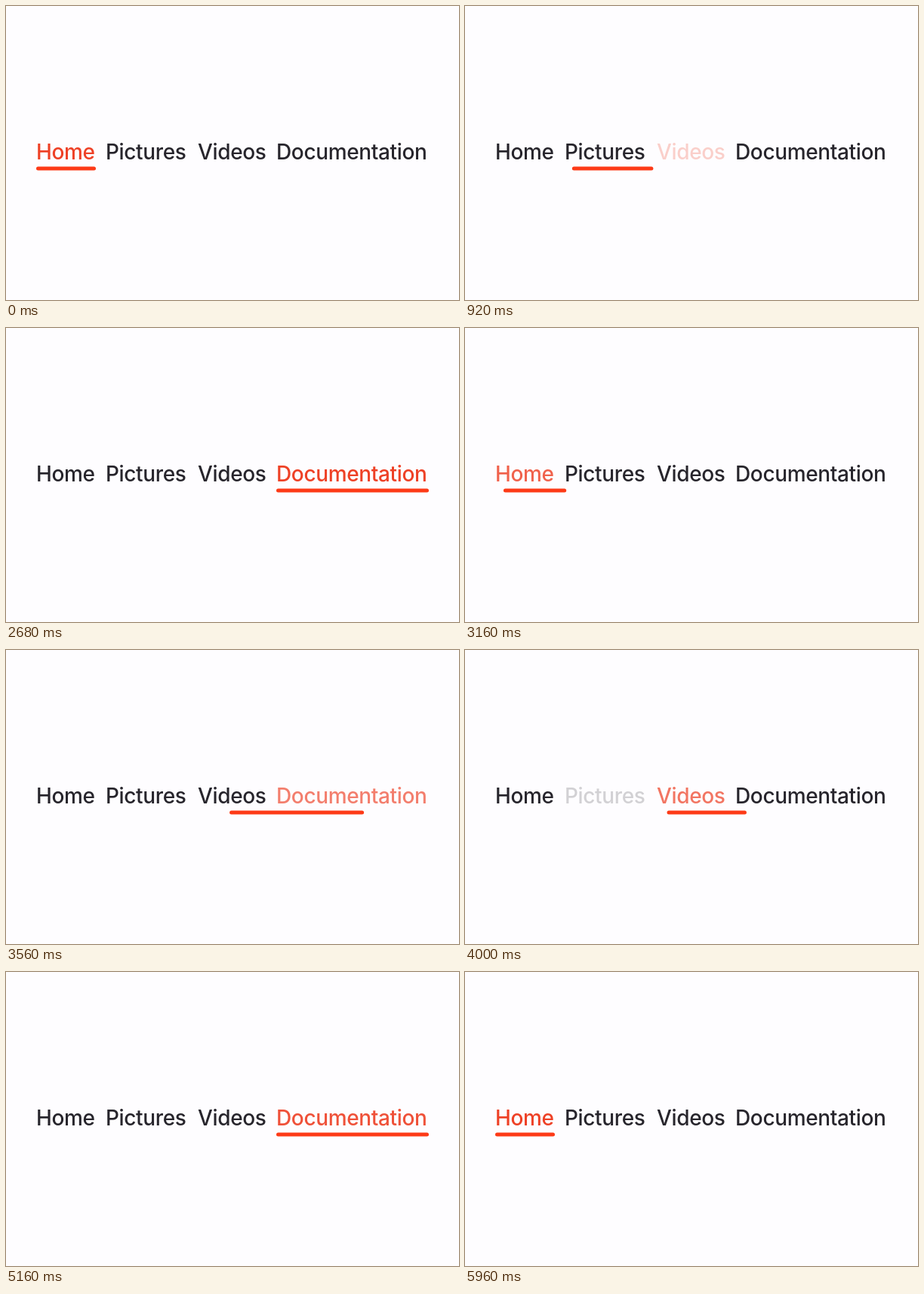
Animation of 600 by 389 pixels, one loop 6000 ms. Source, as an HTML page:

```html
<!DOCTYPE html>
<html lang="en">
<head>
<meta charset="utf-8">
<title>Tab bar</title>
<style>
  html, body { margin: 0; width: 100%; height: 100%; overflow: hidden; background: #fefdff; }
  svg { display: block; width: 600px; height: 389px; }
  text { font: 500 28px Inter, "Open Sans", sans-serif; letter-spacing: -.36px; }
</style>
</head>
<body>
<svg viewBox="0 0 600 389">
  <rect id="bar" y="212.5" height="5" rx="2.5" fill="#fd3a17"/>
</svg>
<script>
const LOOP = 6000, SLIDE = 350, FADE = 450, DIM = .2;
const RED = '#ee4126', INK = '#27252c';

// label, left and right edge
const tabs = [
  ['Home', 40, 119],
  ['Pictures', 132, 241],
  ['Videos', 254, 345],
  ['Documentation', 358, 560]
];

// tab, press time, release time
const taps = [
  [0, -800, -550],
  [1, 40, 270],
  [2, 680, 860],
  [1, 1120, 1320],
  [3, 1720, 1950],
  [0, 2740, 2850],
  [3, 3200, 3310],
  [2, 3600, 3730],
  [1, 4000, 4124],
  [3, 4560, 4805],
  [0, 5200, 5445]
];

const svg = document.querySelector('svg');
const bar = document.getElementById('bar');
const labels = tabs.map(([name, left]) => {
  const el = document.createElementNS('http://www.w3.org/2000/svg', 'text');
  el.textContent = name;
  el.setAttribute('x', left);
  el.setAttribute('y', 203);
  return svg.appendChild(el);
});

const ease = x => {
  x = Math.min(1, Math.max(0, x));
  return x * x * (3 - 2 * x);
};
const mix = (a, b, p) => a + (b - a) * p;

function draw(t) {
  const now = taps.findLastIndex(tap => tap[2] <= t);
  const [active, , release] = taps[now];
  const from = tabs[taps[Math.max(0, now - 1)][0]], to = tabs[active];
  const p = ease((t - release) / SLIDE);
  const left = mix(from[1], to[1], p), right = mix(from[2], to[2], p);
  bar.setAttribute('x', left);
  bar.setAttribute('width', right - left);

  labels.forEach((el, i) => {
    const last = taps.findLast(tap => tap[0] === i && tap[1] <= t);
    el.setAttribute('fill', i === active ? RED : INK);
    el.setAttribute('opacity', last ? mix(DIM, 1, ease((t - last[2]) / FADE)) : 1);
  });
}

const start = performance.now();
function tick() {
  draw((performance.now() - start) % LOOP);
  requestAnimationFrame(tick);
}
tick();
</script>
</body>
</html>
```
